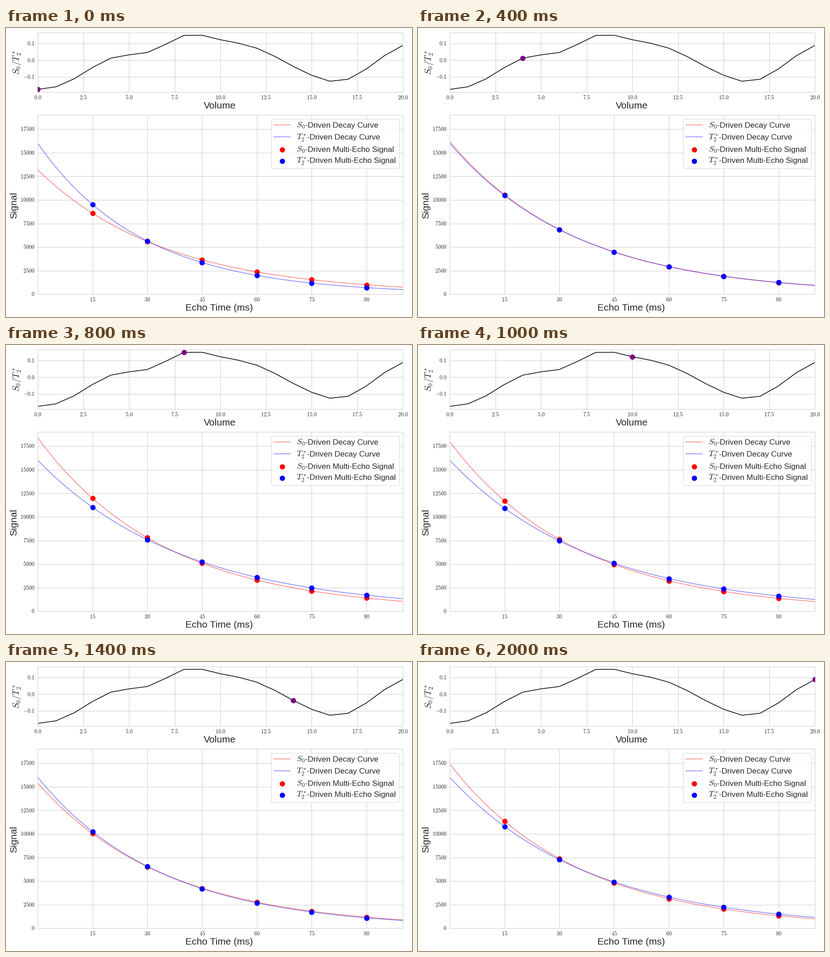
Animation, 885 px wide and 632 px high, one loop 2100 ms. Source, as a matplotlib script:

```python
import numpy as np
import matplotlib.pyplot as plt
from matplotlib.animation import FuncAnimation
from matplotlib.patches import FancyBboxPatch

W, H, DPI = 885, 632, 72  # at 72 dpi one point is one pixel
LEFT, RIGHT = 69.2, 865.2
INK, GRID = "0.15", "0.8"
S0, T2 = 16000, 35

plt.rcParams.update({"font.family": "Liberation Sans", "mathtext.fontset": "cm"})

change = np.array([-.176, -.1605, -.112, -.044, .012, .032, .046, .095, .149,
                   .150, .123, .102, .072, .022, -.038, -.091, -.127, -.115,
                   -.053, .028, .0885])
volumes = np.arange(len(change))
times = np.linspace(0, 100, 201)
echoes = np.arange(15, 91, 15)

fig = plt.figure(figsize=(W / DPI, H / DPI), dpi=DPI, facecolor="white")

# Page-wide layer in pixel units for labels and legend
page = fig.add_axes([0, 0, 1, 1], zorder=3)
page.set(xlim=(0, W), ylim=(H, 0))
page.axis("off")


def put(x, y, text, size, **kw):
    page.text(x, y, text, fontsize=size, color=INK, va="baseline",
              rotation_mode="anchor", **kw)


def panel(top, bottom, xlim, ylim, xticks, yticks, xfmt, yfmt):
    ax = fig.add_axes([LEFT / W, 1 - bottom / H, (RIGHT - LEFT) / W, (bottom - top) / H])
    ax.set(xlim=xlim, ylim=ylim, xticks=xticks, yticks=yticks)
    ax.set_axisbelow(True)
    ax.grid(color=GRID, lw=1)
    ax.tick_params(length=0, labelbottom=False, labelleft=False)
    for spine in ax.spines.values():
        spine.set(color=GRID, linewidth=1)
    for v in xticks:
        x = LEFT + (RIGHT - LEFT) * (v - xlim[0]) / (xlim[1] - xlim[0])
        put(x, bottom + 15.4, f"${v:{xfmt}}$", 12, ha="center")
    for v in yticks:
        y = bottom - (bottom - top) * (v - ylim[0]) / (ylim[1] - ylim[0])
        put(LEFT - 6.5, y + 4.2, f"${v:{yfmt}}$", 12, ha="right")
    return ax


def dots(ax, color):
    return ax.scatter([], [], s=100, color=color, linewidths=1.5, zorder=3)


def decay(t, s0, t2):
    return s0 * np.exp(-t / t2)


upper = panel(10.4, 140.4, (0, 20), (-.193, .165),
              np.arange(0, 20.1, 2.5), [-.1, 0, .1], ".1f", ".1f")
lower = panel(190.3, 582.3, (0, 100), (0, 19000),
              echoes, np.arange(0, 17501, 2500), "d", "d")

put(28.5, 75.5, "$S_0/T_2^*$", 19.5, rotation=90, ha="center")
put(466, 176.5, "Volume", 21, ha="center")
put(23.5, 387.5, "Signal", 21, rotation=90, ha="center")
put(465, 618, "Echo Time (ms)", 21, ha="center")

# Legend
page.add_patch(FancyBboxPatch((577.5, 198.5), 279, 108, snap=True,
                              boxstyle="round,pad=0,rounding_size=3.6",
                              fc="white", ec=GRID, lw=1, alpha=.8))
rows = [("red", 212, 218, "Decay Curve"), ("blue", 238.4, 244, "Decay Curve"),
        ("red", 265.5, 270.5, "Multi-Echo Signal"), ("blue", 290.8, 295, "Multi-Echo Signal")]
for color, y, base, what in rows:
    symbol, x = ("$S_0$", 652.3) if color == "red" else ("$T_2^*$", 655.5)
    if what == "Decay Curve":
        page.plot([583.8, 619.8], [y, y], color=color, lw=1.5, alpha=.5)
    else:
        page.scatter([601.6], [y], s=100, color=color, linewidths=1.5)
    put(633, base, symbol, 18)
    put(x, base, f"-Driven {what}", 17.1)

upper.plot(volumes, change, color="black", lw=1.5)
marker = dots(upper, "purple")
red_line, = lower.plot([], [], color="red", lw=1.5, alpha=.5)
blue_line, = lower.plot([], [], color="blue", lw=1.5, alpha=.5)
red_dots, blue_dots = dots(lower, "red"), dots(lower, "blue")


def draw(i):
    scale = 1 + change[i]
    marker.set_offsets([[volumes[i], change[i]]])
    for line, points, s0, t2 in ((red_line, red_dots, S0 * scale, T2),
                                 (blue_line, blue_dots, S0, T2 * scale)):
        line.set_data(times, decay(times, s0, t2))
        points.set_offsets(np.column_stack([echoes, decay(echoes, s0, t2)]))
    return marker, red_line, blue_line, red_dots, blue_dots


anim = FuncAnimation(fig, draw, frames=len(volumes), interval=100, repeat=True)
plt.show()
```
